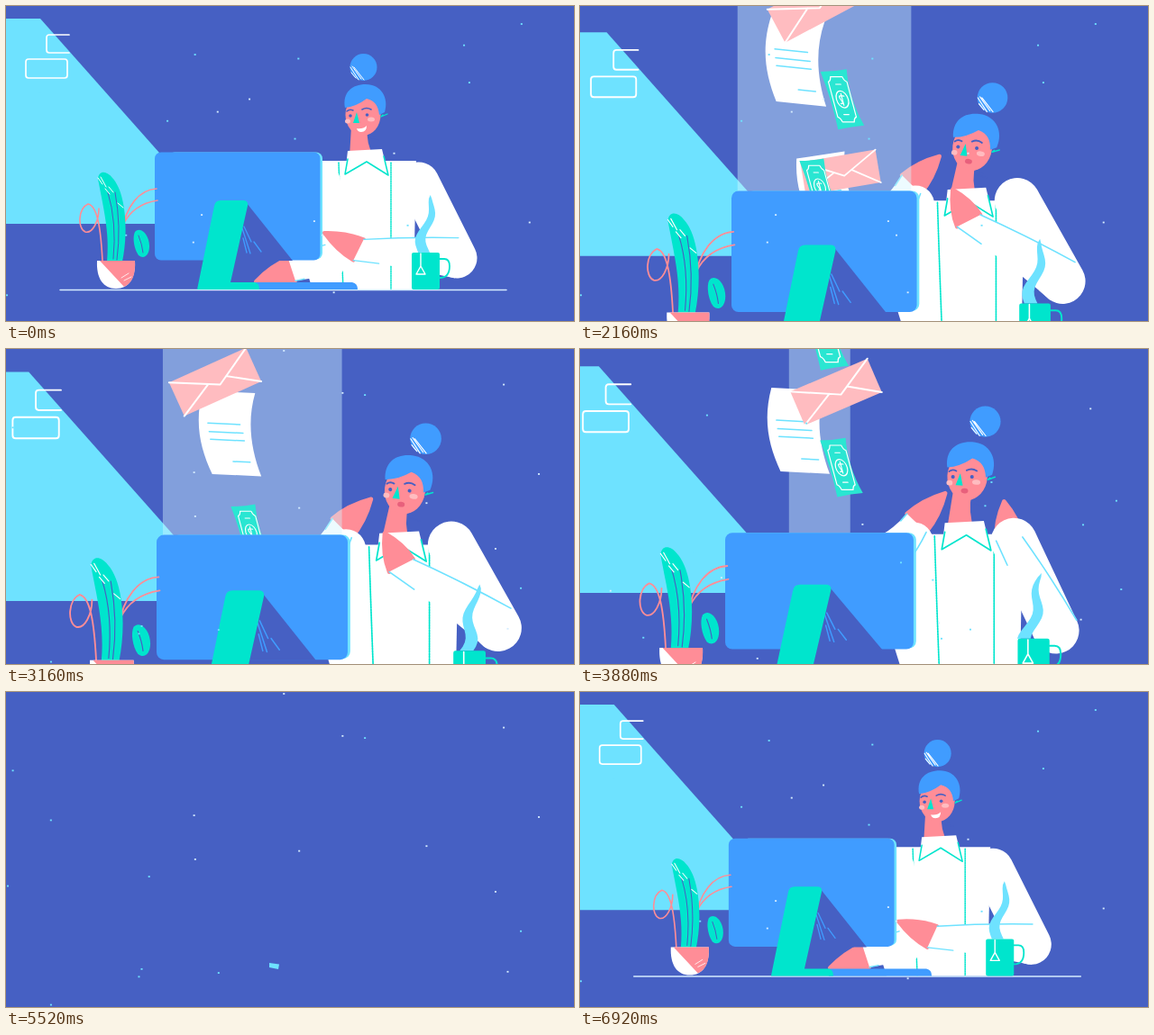
Animation of 630 by 350 pixels, one loop 6960 ms. Source, as an HTML page:

```html
<!DOCTYPE html>
<html lang="en">
<head>
<meta charset="utf-8">
<title>Desk</title>
<style>
html, body { margin: 0; width: 100%; height: 100%; overflow: hidden; background: #4660c3; }
svg { display: block; width: 100vw; height: 100vh; }
.line { fill: none; stroke-linecap: round; stroke-linejoin: round; }
.white { fill: #fff; } .blue { fill: #409cff; } .cyan { fill: #6ee2ff; }
.green { fill: #00e5cd; } .pink { fill: #ff8d97; } .navy { fill: #4660c3; }
.sw { stroke: #fff; } .sb { stroke: #409cff; } .sc { stroke: #6ee2ff; }
.sg { stroke: #00e5cd; } .sp { stroke: #ff8d97; } .sn { stroke: #4660c3; }
</style>
</head>
<body>
<svg viewBox="0 0 630 350" preserveAspectRatio="none">
  <defs>
    <g id="envelope">
      <path d="M-48-21H48V21H-48Z" fill="#ffbcc0"/>
      <path class="line sw" stroke-width="2" d="M-48-21L4 5 48-21M-48 21L-8-1M48 21L14-1"/>
    </g>
    <g id="letter">
      <path class="white" d="M-32-48C-40-10-32 20-16 50H42C28 18 22-14 30-48Z"/>
      <path class="line sc" stroke-width="1.6" d="M-24-10H14M-22 0H18M-20 9H20M8 34H28"/>
    </g>
    <g id="note">
      <path d="M-26-33Q-10-33 5-36Q8 0 26 31Q12 32-5 36Q-13 0-26-33Z" fill="#2ae6d2"/>
      <g transform="skewX(15)">
        <path class="line sw" stroke-width="1.3" d="M-7-27H7Q8-22 11-21V21Q8 22 7 27H-7Q-8 22-11 21V-21Q-8-22-7-27ZM3-4Q-5-6-2 0T-3 5M0-7V7M-3-18H3M-3 18H3"/>
        <ellipse class="line sw" stroke-width="1.3" rx="7" ry="10"/>
      </g>
    </g>
  </defs>
  <rect class="navy" width="630" height="350"/>
  <g id="window">
    <path class="cyan" d="M-300 0H0L202 228H-300Z"/>
    <path class="line sw" stroke-width="1.7" d="M-13 45H27Q30 45 30 48V63Q30 66 27 66H-13Q-16 66-16 63V48Q-16 45-13 45ZM32 18H10Q7 18 7 21V35Q7 38 10 38H32"/>
  </g>
  <g id="back">
    <g id="woman">
      <path id="neck" class="pink"/>
      <path class="white" d="M330 178Q336 172 350 172H455L452 315H340L330 283Z"/>
      <path class="white" d="M379 161L417 159 424 188 400 174 376 187Z"/>
      <path class="line sg" stroke-width="1.5" d="M379 170L376 187 400 173 424 188 419 167"/>
      <path class="line sg" stroke-width="1.5" stroke-dasharray="1.5 1" d="M369 174Q371 240 374 315M427 174V315"/>
      <g id="bun">
        <circle class="blue" cx="396.500" cy="68" r="15"/>
        <path class="line sw" d="M382 68L391 82M383 74L388 80M384 67L394 81M386 68L397 82"/>
      </g>
      <g id="head">
        <ellipse class="pink" cx="396" cy="121" rx="19.500" ry="23"/>
        <path class="blue" d="M376 113C373 96 384 87 399 87C416 87 425 102 420 118L414 121C413 111 409 105 400 103Q388 112 376 113Z"/>
        <path class="line sn" stroke-width="1.6" d="M378 117Q381 114 385 116M395 115Q400 112 405 115"/>
        <circle class="navy" cx="382" cy="122" r="1.800"/><circle class="navy" cx="400.500" cy="121" r="1.800"/>
        <path class="green" d="M389 118L392 130 385 130Z"/>
        <ellipse cx="379" cy="128" rx="3" ry="2.500" fill="#ffbcc0"/><ellipse cx="405" cy="126" rx="4" ry="2.500" fill="#ffbcc0"/>
        <path id="smile" class="white" d="M389 136Q396 137 400 133Q400 140 394 140Q390 140 389 136Z"/>
        <ellipse id="gasp" cx="394" cy="135" rx="3.500" ry="2.500" fill="#e8607c"/>
        <path id="calm" class="line sw" d="M388 135Q391 137 394 135"/>
        <path class="line sg" stroke-width="1.3" d="M416 123L423 120M416 123L418 121"/>
        <path class="line sn" d="M403 143L410 145M404 147L414 149"/>
      </g>
      <g id="armL"></g>
      <g id="armR"></g>
    </g>
    <rect id="beam" y="-300" height="520" fill="#d4f5ff" opacity=".42"/>
  </g>
  <g id="mail"></g>
  <g id="front">
    <path id="desk" class="line" stroke="#d5ecff" stroke-width="1.5" d="M60 315.500H555"/>
    <g id="monitor">
      <rect class="cyan" x="180" y="162.500" width="171" height="119" rx="7"/>
      <rect class="blue" x="165" y="162.500" width="183.500" height="120" rx="7"/>
      <path class="navy" d="M267 219L318 283H253Z"/>
      <path class="line sb" stroke-width="1.3" d="M262 247L271 275M264 245L272 262M263 258L267 274M275 262L283 273"/>
      <path class="blue" d="M276 307H384Q390 308 390 315H276Z"/>
      <path class="green" d="M238 216H263Q269 216 268 222L249 307H276Q281 308 281 315H212L231 222Q232 216 238 216Z"/>
    </g>
    <g id="plant">
      <path class="line sp" stroke-width="1.6" d="M107 283C105 245 101 222 91 220C80 225 79 247 88 251C96 253 103 239 103 225M128 252C133 222 148 204 167 203M130 243C137 228 149 219 168 216"/>
      <path class="green" d="M102 192C103 182 112 183 118 191C133 207 136 250 129 284H112C115 250 108 225 102 192Z"/>
      <path class="line sn" d="M113 207Q123 240 119 281M121 207Q128 245 123 282"/>
      <path class="line sw" d="M102 191L107 198M105 190L111 201M110 203L115 209M114 201L119 207M124 219L130 224"/>
      <path class="green" d="M143 251C149 244 159 254 159 267C159 277 153 282 147 277C142 270 140 257 143 251Z"/>
      <path class="line sn" d="M147 255Q151 265 152 274"/>
      <path class="white" d="M101 283H143C144 303 136 314 122 314S100 303 101 283Z"/>
      <path class="pink" d="M104 283H143C144 298 140 308 131 312Z"/>
      <path class="line sw" stroke-width=".8" d="M128 302L136 297M131 305L139 301"/>
    </g>
    <g id="mug">
      <path id="steam" class="cyan"/>
      <path class="line sg" stroke-width="1.8" d="M481 281H486Q492 281 492 289Q492 302 481 302"/>
      <rect class="green" x="450" y="274" width="31" height="41" rx="2"/>
      <path class="line sw" stroke-width="1.4" d="M460 275V289L455 298H465L460 289"/>
    </g>
  </g>
  <path id="spark" class="cyan" d="M292 301L303 302.500 302 308 292 306Z"/>
  <g id="stars"></g>
</svg>
<script>
const LOOP = 6960;
const $ = id => document.getElementById(id);
const set = (id, name, value) => $(id).setAttribute(name, value);
const visible = (el, on) => el.setAttribute('visibility', on ? 'visible' : 'hidden');
const clamp = x => Math.min(1, Math.max(0, x));
const ramp = (t, from, to) => {
  const u = clamp((t - from) / (to - from));
  return u * u * (3 - 2 * u);
};

// How far each mood has taken over at time t.
function moods(t) {
  const relax = ramp(t, 3500, 4200);
  const beat = t > LOOP / 2 ? t - LOOP : t;
  const typing = 1 - ramp(t, 1440, 1700) + ramp(t, 5900, 6200);
  return {
    notice: ramp(t, 1200, 1440) - relax,
    surprise: ramp(t, 1440, 1850) - relax,
    raise: relax - ramp(t, 5000, 5500),
    press: typing * (1 - Math.cos(beat / 288 * Math.PI)) / 2
  };
}

// Camera: a slow pull-back while she works, a quick push-in when the mail erupts.
function camera(t) {
  const near = ramp(t, 1440, 2000) - ramp(t, 3500, 4300);
  const far = ramp(t, 0, 800) - ramp(t, 1440, 2000);
  const after = ramp(t, 3500, 4300) * (1 - ramp(t, 4500, 7100));
  const drift = near * (t - 2160) / 1000;
  return {
    x: 165 + 8 * far + 3 * near - 10 * after - drift,
    y: 162 + 10 * far + 43 * near + 18 * after + drift,
    scale: 1 - .048 * far + .12 * near + .09 * after + .035 * drift
  };
}

const arms = {
  armR: {
    rest: { shoulder: [458, 196], elbow: [500, 280], wrist: [391, 271], tip: [353, 252] },
    press: { wrist: [383, 286], tip: [350, 305] },
    surprise: { shoulder: [448, 172], elbow: [493, 252], wrist: [400, 192], tip: [384, 161] },
    raise: { shoulder: [445, 184], elbow: [483, 277], wrist: [474, 165], tip: [477, 124] }
  },
  armL: {
    rest: { shoulder: [352, 195], elbow: [358, 284], wrist: [317, 293], tip: [277, 306] },
    surprise: { shoulder: [347, 176], elbow: [318, 195], wrist: [343, 156], tip: [371, 128] },
    raise: { shoulder: [350, 182], elbow: [335, 183], wrist: [358, 165], tip: [386, 135] }
  }
};
for (const id in arms) {
  $(id).innerHTML = '<path class="pink sp" stroke-width="4" stroke-linejoin="round"/>' +
    '<path class="line sw"/><path class="white"/><path class="line sc" stroke-width="1.4"/>';
}

function drawArm(id, mood, radius) {
  const { rest, ...others } = arms[id];
  const joint = name => rest[name].map((v, i) => Object.keys(others).reduce(
    (sum, key) => sum + mood[key] * ((others[key][name] || rest[name])[i] - v), v));
  const [shoulder, elbow, wrist, tip] = ['shoulder', 'elbow', 'wrist', 'tip'].map(joint);
  const normal = (p, q) => {
    const len = Math.hypot(q[0] - p[0], q[1] - p[1]);
    return [(p[1] - q[1]) / len, (q[0] - p[0]) / len];
  };
  const off = (p, n, d) => [p[0] + n[0] * d, p[1] + n[1] * d];
  const mid = (p, q) => [(p[0] + q[0]) / 2, (p[1] + q[1]) / 2];
  const n = normal(wrist, tip), m = normal(elbow, wrist);
  const a = off(wrist, n, 13), b = off(wrist, n, -13);
  const ea = off(elbow, m, radius), eb = off(elbow, m, -radius);
  const qa = off(mid(a, tip), n, 5), qb = off(mid(b, tip), n, -5);
  const sa = off(mid(a, ea), m, 2), sb = off(mid(b, eb), m, 3);
  const [hand, upper, sleeve, seam] = $(id).children;
  hand.setAttribute('d', `M${a}Q${qa} ${tip}Q${qb} ${b}Z`);
  upper.setAttribute('stroke-width', 2 * radius);
  upper.setAttribute('d', `M${shoulder}L${elbow}`);
  sleeve.setAttribute('d', `M${a}Q${sa} ${ea}L${eb}Q${sb} ${b}Z`);
  seam.setAttribute('d', `M${a}Q${sa} ${ea}M${b}L${mid(b, sb)}`);
}

// Rising mail: kind, launch time and column; tilt and size follow the height.
const mail = [
  ['letter', 1660, 238], ['envelope', 1460, 260], ['note', 1807, 291],
  ['letter', 2150, 274], ['envelope', 2077, 289], ['note', 2130, 266],
  ['letter', 2770, 246], ['envelope', 2583, 232], ['note', 3140, 272],
  ['letter', 3480, 240], ['envelope', 3340, 284], ['note', 3620, 290]
];
const tilt = { envelope: y => y * .1 - 28, letter: y => 12 - y * .1, note: () => 0 };
$('mail').innerHTML = mail.map(([kind]) => `<use href="#${kind}"/>`).join('');

function drawMail(t) {
  mail.forEach(([kind, launch, x], i) => {
    const y = 210 - .3 * (t - launch), item = $('mail').children[i];
    visible(item, t < 4100 && y < 258 && y > -90);
    item.setAttribute('transform',
      `translate(${x} ${y}) rotate(${tilt[kind](y)}) scale(${1 - .13 * clamp(y / 200)})`);
  });
}

let seed = 7;
const random = () => (seed = seed * 16807 % 2147483647) / 2147483647;
const star = () => `<rect x="${random() * 628}" y="${random() * 348}" width="2" height="1.8" ` +
  `fill="${random() < .6 ? '#6ee2ff' : '#d5ecff'}"/>`;
$('stars').innerHTML = Array.from({ length: 3 }, () =>
  `<g>${Array.from({ length: 20 }, star).join('')}</g>`).join('');

function drawSteam(t) {
  const left = [], right = [];
  for (let i = 0; i <= 16; i++) {
    const u = i / 16, y = 274 - 64 * u, w = 6.5 * Math.sqrt(1 - u);
    const x = 461 + 12 * u + 5 * Math.sin(u * 8 + 2.6 - t / 1160 * Math.PI) * (1 - u * .5);
    left.push(`${x - w} ${y}`);
    right.unshift(`${x + w} ${y}`);
  }
  set('steam', 'd', `M${left.join('L')}L${right.join('L')}Z`);
}

// Presence of a part: shrinks away, then springs back from its start time.
function presence(t, start) {
  if (t < 5400) return 1 - clamp((t - 5020) / 340) ** 3;
  const v = clamp((t - start) / 420) - 1;
  return v <= -1 ? 0 : 1 + 2.2 * v ** 3 + 1.2 * v ** 2;
}
function grow(id, t, start, x, y, squash = 1) {
  const k = presence(t, start);
  visible($(id), k > 0);
  set(id, 'transform', `translate(${x} ${y}) scale(${k} ${k * squash}) translate(${-x} ${-y})`);
}

function drawScene(t, mood) {
  const { x, y, scale } = camera(t);
  const view = `translate(${x} ${y}) scale(${scale}) translate(-165 -162)`;
  set('back', 'transform', view);
  set('front', 'transform', view);

  // The window lies further back, so it zooms less.
  const depth = 1 + .75 * (scale - 1);
  const sill = 242 + .71 * (y - 162) + 44 * (scale - 1);
  const slide = 260 * (1 - presence(t, 5640));
  set('window', 'transform',
    `translate(${x - 127 * depth - slide} ${sill - 228 * depth}) scale(${depth})`);

  grow('monitor', t, 5540, 297, 315, 1 - .095 * mood.raise);
  grow('desk', t, 5560, 307, 315);
  grow('woman', t, 5700, 400, 315);
  grow('plant', t, 5840, 122, 314);
  grow('mug', t, 5940, 465, 315);
  visible($('spark'), t >= 5500 && t < 5560);

  const width = 45 * ramp(t, 1360, 1440) + 127 * ramp(t, 1440, 1700) - 172 * ramp(t, 3700, 4000);
  set('beam', 'x', 257 - width / 2);
  set('beam', 'width', Math.max(0, width));
}

function drawWoman(t, mood) {
  const hx = 10 * mood.notice + 3 * mood.raise, hy = -mood.notice - 8 * mood.raise;
  set('head', 'transform', `translate(${hx} ${hy}) rotate(${7 * mood.notice} 399 100)`);
  set('bun', 'transform',
    `translate(${27 * mood.notice + 18 * mood.raise} ${2 * mood.notice - 12 * mood.raise})`);
  const nx = hx - 4 * mood.notice;
  set('neck', 'd', `M${383 + nx} ${134 + hy}L381 168H408Q${399 + nx / 2} 152 ${401 + nx} ${136 + hy}Z`);
  visible($('smile'), t < 1600 || t > 5200);
  visible($('gasp'), t >= 1600 && t < 4000);
  visible($('calm'), t >= 4000 && t <= 5200);
  drawArm('armL', mood, 19);
  drawArm('armR', mood, 22.5);
}

function draw(t) {
  const mood = moods(t);
  drawScene(t, mood);
  drawWoman(t, mood);
  drawSteam(t);
  drawMail(t);
  const lit = Math.floor((t + 200) / (LOOP / 9)) % 3;
  [...$('stars').children].forEach((group, i) => visible(group, i === lit));
}

const begin = performance.now();
function tick() {
  draw((performance.now() - begin) % LOOP);
  requestAnimationFrame(tick);
}
tick();
</script>
</body>
</html>
```
